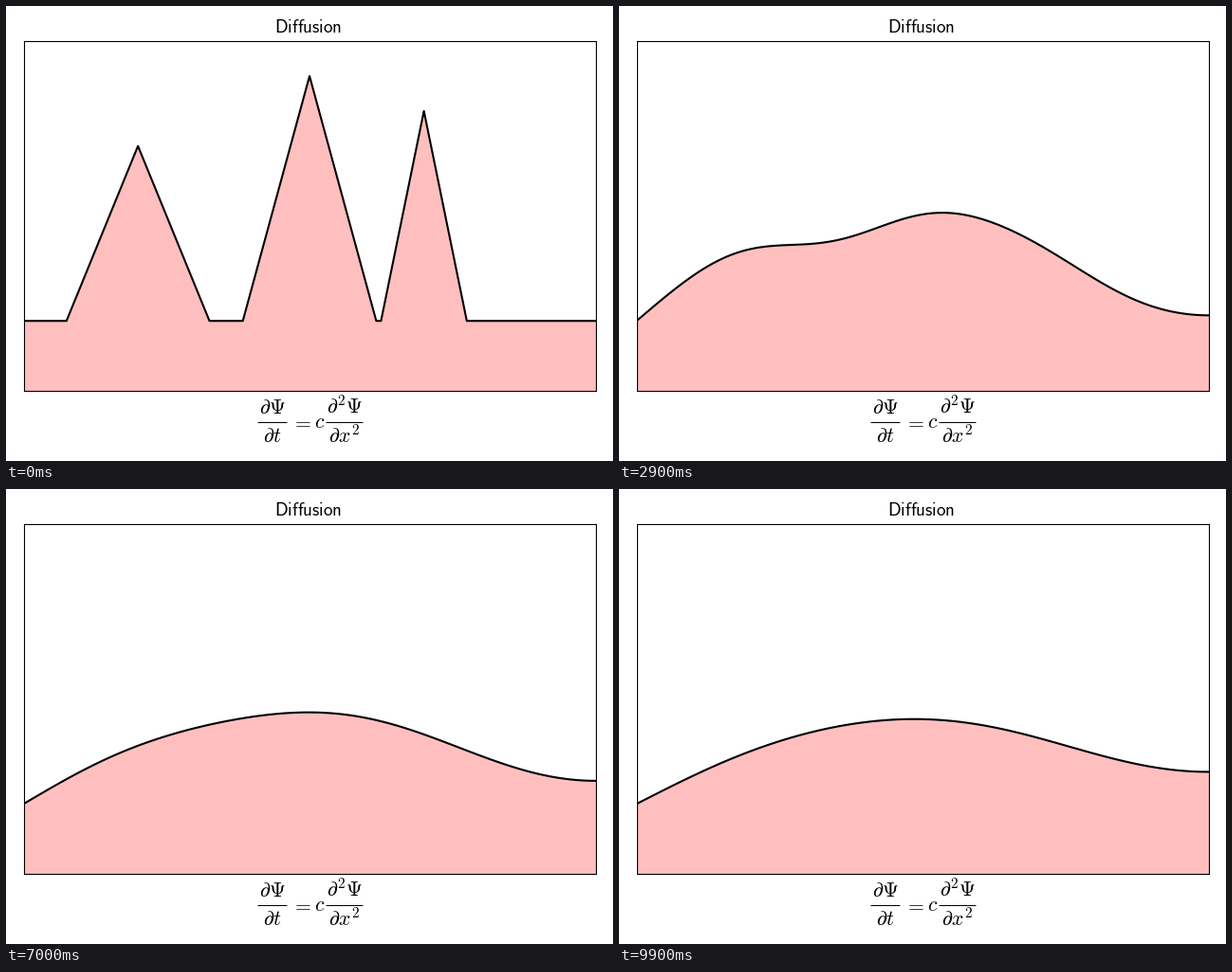
A matplotlib script for the animation above (10 s loop, 640x480 px).

```python
import numpy as np
import matplotlib.pyplot as plt
from matplotlib.animation import FuncAnimation

W, H, DPI = 640, 480, 100
FRAMES, INTERVAL = 100, 100
CELLS = 120
SUBSTEPS, RATE = 9, 0.4      # explicit diffusion steps per frame, c*dt/dx^2
BASE = 0.2
PEAKS = [(24, 15, 0.5), (60, 14, 0.7), (84, 9, 0.6)]   # centre, half width, height

plt.rcParams["mathtext.fontset"] = "cm"


def initial(x):
    u = np.full(x.shape, BASE)
    for centre, half, height in PEAKS:
        u += height * np.clip(1 - np.abs(x - centre) / half, 0, None)
    return u


def diffuse(u):
    """Advance one frame: left end held fixed, right end insulated."""
    u = u.copy()
    for _ in range(SUBSTEPS):
        lap = np.zeros_like(u)
        lap[1:-1] = u[2:] - 2 * u[1:-1] + u[:-2]
        lap[-1] = 2 * (u[-2] - u[-1])
        u += RATE * lap
    return u


x = np.arange(CELLS + 1.0)
states = [initial(x)]
for _ in range(FRAMES - 1):
    states.append(diffuse(states[-1]))

fig = plt.figure(figsize=(W / DPI, H / DPI), dpi=DPI, facecolor="white")
left, right, top, bottom = 18.55, 621.52, 37, 406
ax = fig.add_axes([left / W, 1 - bottom / H, (right - left) / W, (bottom - top) / H])
ax.set(xlim=(0, CELLS), ylim=(0, 1), xticks=[], yticks=[])


def label(px, py, tex, size=15.7):
    fig.text(px / W, 1 - py / H, f"${tex}$", fontsize=size, color="black",
             ha="center", va="baseline")


def fraction(x0, x1, num, den):
    mid = (x0 + x1) / 2
    label(mid, 430, num)
    label(mid, 460.2, den)
    y = 1 - 439.1 / H
    fig.add_artist(plt.Line2D([x0 / W, x1 / W], [y, y], lw=0.72, color="black",
                              solid_capstyle="butt", transform=fig.transFigure))


label(318.4, 28.3, r"\mathsf{Diffusion}", 13.7)
fraction(265, 296, r"\partial\Psi", r"\partial t")
label(311.5, 445, "=")
label(331, 445, "c")
fraction(337, 376, r"\partial^2\Psi", r"\partial x^2")

fill = ax.fill_between(x, 0, states[0], color="red", alpha=0.25, lw=0)
line, = ax.plot(x, states[0], color="black", lw=1.5)


def update(i):
    u = states[i]
    line.set_ydata(u)
    outline = np.column_stack([x, u])
    fill.set_verts([np.vstack([[0, 0], outline, [CELLS, 0]])])
    return fill, line


anim = FuncAnimation(fig, update, frames=FRAMES, interval=INTERVAL,
                     repeat=True, repeat_delay=0, blit=False)
plt.show()
```
